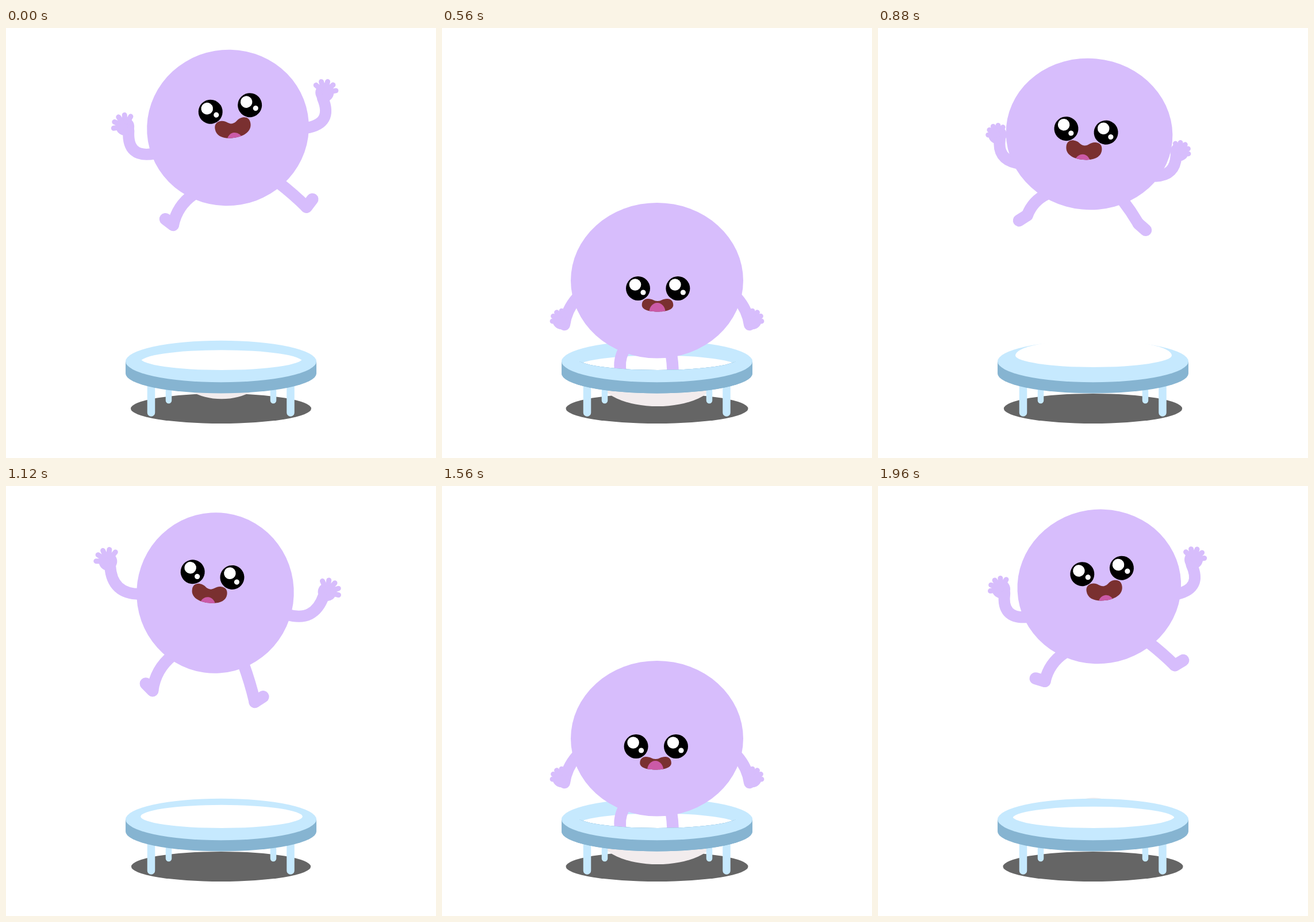
Recreate the animation shown at these times as an HTML page with a canvas. Size 748 by 748 pixels, loop 2000 ms.

```html
<!DOCTYPE html>
<html lang="en">
<head>
<meta charset="utf-8">
<title>Trampoline</title>
<style>
html, body { margin: 0; width: 100%; height: 100%; overflow: hidden; background: #fff; }
canvas { display: block; width: 100vw; height: 100vh; }
</style>
</head>
<body>
<canvas id="stage" width="748" height="748"></canvas>
<script>
const SIZE = 748, LOOP = 2000, BOUNCE = 1000, STEP = 40;
const CONTACT = 340, RELEASE = 720, STAND_Y = 328;
const SKIN = '#d7bdfc', RIM = '#c6e9fe', SKIRT = '#86b4d1';
const ctx = document.getElementById('stage').getContext('2d');
const rad = deg => deg * Math.PI / 180;
const clamp = v => Math.max(0, Math.min(1, v));

const heightKeys = [[0, [173.5]], [120, [186]], [320, [328.3]], [560, [439.3]], [720, [318]], [880, [184.5]]];

// Half a symmetric figure, measured outwards from the body centre:
// rx, ry, face y, mouth opening | hand x, y, shoulder y, elbow bend, finger angle, finger length | heel x, y, toe angle
const poseKeys = [
  [0, [141, 135.7, -32.4, 1, 176, -32, 23, .65, 65, 20, 117, 155, -45]],
  [320, [132, 144.5, -23.6, .35, 210, -12, 18, 0, 40, 21, 30, 225, -17]],
  [560, [150, 135.3, 13.7, 0, 166, 69, 31, -.15, 58, 16, 45, 163, 20]],
  [720, [135, 142, 0, .5, 160, 40, 40, .3, 58, 16, 38, 228, -17]],
  [880, [145, 131.7, -5.5, .95, 159, 16, 62, .46, 57, 16, 97, 149, 37]]
];

// tilt, face x, body x; every other bounce leans the opposite way
const leanHalf = [[0, [-9.6, 9.5, 12]], [320, [-3, 8, 4]], [560, [0, 1.7, 0]], [880, [5.4, -6, -6.5]]];
const leanKeys = [...leanHalf, ...leanHalf.map(([t, v]) => [t + BOUNCE, v.map(n => -n)])];

// Smooth cyclic interpolation that never overshoots its keys
function sample(keys, time, span) {
  const t = time % span, n = keys.length, i = keys.findLastIndex(k => k[0] <= t);
  const [a, b, c, d] = [-1, 0, 1, 2].map(o => {
    const j = i + o, [at, v] = keys[(j + n) % n];
    return { t: at + span * Math.floor(j / n), v };
  });
  const h = c.t - b.t, u = (t - b.t) / h;
  const mean = (p, q) => p * q > 0 ? 2 * p * q / (p + q) : 0;
  return b.v.map((v, k) => {
    const slope = (p, q) => (q.v[k] - p.v[k]) / (q.t - p.t);
    const m = slope(b, c), m0 = mean(slope(a, b), m), m1 = mean(m, slope(c, d));
    return v + (c.v[k] - v) * u * u * (3 - 2 * u)
      + h * u * (1 - u) * (m0 * (1 - u) - m1 * u);
  });
}

function oval(color, x, y, rx, ry = rx) {
  ctx.fillStyle = color;
  ctx.beginPath();
  ctx.ellipse(x, y, rx, ry, 0, 0, 7);
  ctx.fill();
}

function line(color, width, x1, y1, x2, y2) {
  bentLine(color, width, x1, y1, x2, y2, 0);
}

// Curve whose control point stands off the middle by bend times the length
function bentLine(color, width, x1, y1, x2, y2, bend) {
  ctx.strokeStyle = color;
  ctx.lineWidth = width;
  ctx.beginPath();
  ctx.moveTo(x1, y1);
  ctx.quadraticCurveTo((x1 + x2) / 2 + (y2 - y1) * bend, (y1 + y2) / 2 - (x2 - x1) * bend, x2, y2);
  ctx.stroke();
}

// Runs the drawing for the left (-1) and the right (1) half
function bothSides(angle, paint) {
  for (const side of [-1, 1]) {
    ctx.save();
    ctx.rotate(rad(angle));
    ctx.scale(side, 1);
    paint(side);
    ctx.restore();
  }
}

const edge = (v, along, across) => across * Math.sqrt(1 - (v / along) ** 2);

function arm(rx, ry, x, y, shoulder, bend, aim, reach) {
  bentLine(SKIN, 20, edge(shoulder, ry, rx) - 6, shoulder, x - 5, y + 8, -bend);
  oval(SKIN, x, y, 16);
  for (let i = -2; i <= 2; i++) {
    const a = rad(i * 32 - aim);
    line(SKIN, 9, x, y, x + reach * Math.cos(a), y + reach * Math.sin(a));
  }
}

function leg(rx, ry, x, y, toe, bend) {
  const hip = 20 + .47 * x, a = rad(toe);
  bentLine(SKIN, 20.5, hip, edge(hip, rx, ry) - 8, x, y, bend);
  line(SKIN, 21, x, y, x + 17 * Math.cos(a), y + 17 * Math.sin(a));
}

function mouth(open) {
  const w = 27.3 + 4 * open, top = -11 - 5 * open, dip = -7 - 1.5 * open;
  const bottom = 11.5 + 5 * open, side = top + 11 + open;
  const low = side + (bottom - side) * .7;
  ctx.save();
  ctx.translate(-.7, 29 + 6 * open);
  ctx.beginPath();
  for (const s of [-1, 1]) {
    ctx.moveTo(0, bottom);
    ctx.bezierCurveTo(s * w * .54, bottom, s * w, low, s * w, side);
    ctx.bezierCurveTo(s * w, top + 4, s * w * .85, top, s * w * .62, top);
    ctx.bezierCurveTo(s * w * .3, top, s * w * .25, dip, 0, dip);
  }
  ctx.fillStyle = '#7a3030';
  ctx.fill();
  ctx.clip();
  oval('#cb5aa7', -.5, 12 + 11.5 * open, 14, 16);
  ctx.restore();
}

function face(x, y, open) {
  ctx.save();
  ctx.translate(x, y);
  for (const eye of [-34.7, 34.7]) {
    oval('#000', eye, 0, 21);
    oval('#fff', eye - 5, -6.5, 10.3);
    oval('#fff', eye + 9, 7, 4.6);
  }
  mouth(open);
  ctx.restore();
}

function character(t) {
  const [y] = sample(heightKeys, t, BOUNCE);
  const [tilt, faceX, drift] = sample(leanKeys, t, LOOP);
  const [rx, ry, faceY, open, ...limbs] = sample(poseKeys, t, BOUNCE);
  const inAir = clamp((STAND_Y - y) / 60), sunk = clamp((y - STAND_Y) / 111);
  ctx.save();
  ctx.translate(SIZE / 2 + drift, y);

  ctx.save();
  ctx.translate(-17 * sunk, 0);
  bothSides(.8 * tilt * inAir, side => leg(rx, ry, ...limbs.slice(6), side < 0 ? .2 : .03));
  ctx.restore();

  bothSides(tilt, () => arm(rx, ry, ...limbs.slice(0, 6)));
  ctx.rotate(rad(tilt));
  oval(SKIN, 0, 0, rx, ry);
  face(faceX, faceY, open);
  ctx.restore();
}

// Pushed down while in contact, then a fading spring
function meshShift(t) {
  if (t > CONTACT && t < RELEASE) return 16 * Math.sin(Math.PI * (t - CONTACT) / (RELEASE - CONTACT));
  const s = (t - RELEASE + BOUNCE) % BOUNCE;
  return -8.5 * Math.exp(-((s / 600) ** 2)) * Math.sin(2 * Math.PI * s / 410);
}

const addOpening = () => ctx.ellipse(375, 574.5, 141, 20.5, 0, 0, 7);

function rim() {
  oval(SKIRT, 374, 601, 166, 34.5);
  ctx.fillRect(208, 580, 332, 21);
  oval(RIM, 374, 580, 166, 36.3);
}

function mesh(shift) {
  const lift = Math.max(0, -shift), y = 574.5 + shift;
  ctx.save();
  if (!lift) {
    ctx.beginPath();
    addOpening();
    ctx.clip();
  }
  ctx.fillStyle = '#fff';
  ctx.beginPath();
  ctx.ellipse(375, y, 141 - lift, 20.5, 0, 0, Math.PI);
  ctx.ellipse(375, y, 141 - lift, 20.5 + 1.35 * lift, 0, Math.PI, 2 * Math.PI);
  ctx.fill();
  ctx.restore();
}

function trampoline(shift) {
  const sag = 7 * Math.sqrt(Math.max(0, shift - 3.7));
  oval('#656565', 374, 662, 156 + shift * .16, 26);
  if (sag) oval('#f2eced', 375, 588 + sag, 54 + 1.92 * sag, 46);
  for (const x of [283, 465]) line(RIM, 10.5, x, 610, x, 648);
  for (const x of [252.5, 495]) line(RIM, 13.5, x, 610, x, 669);
  rim();
  mesh(shift);
}

// The near half of the rim hides the sunken feet
function frontRim() {
  ctx.save();
  ctx.beginPath();
  ctx.rect(0, 575, SIZE, 80);
  ctx.clip();
  ctx.beginPath();
  ctx.rect(0, 0, SIZE, SIZE);
  ctx.moveTo(516, 574.5);
  addOpening();
  ctx.clip('evenodd');
  rim();
  ctx.restore();
}

function draw(now) {
  const t = Math.floor(now % LOOP / STEP) * STEP;
  ctx.fillStyle = '#fff';
  ctx.fillRect(0, 0, SIZE, SIZE);
  ctx.lineCap = ctx.lineJoin = 'round';
  trampoline(meshShift(t % BOUNCE));
  character(t);
  // Above the rim the lifted mesh must stay uncovered
  if (t % BOUNCE > CONTACT && t % BOUNCE < RELEASE) frontRim();
  requestAnimationFrame(draw);
}
requestAnimationFrame(draw);
</script>
</body>
</html>
```
